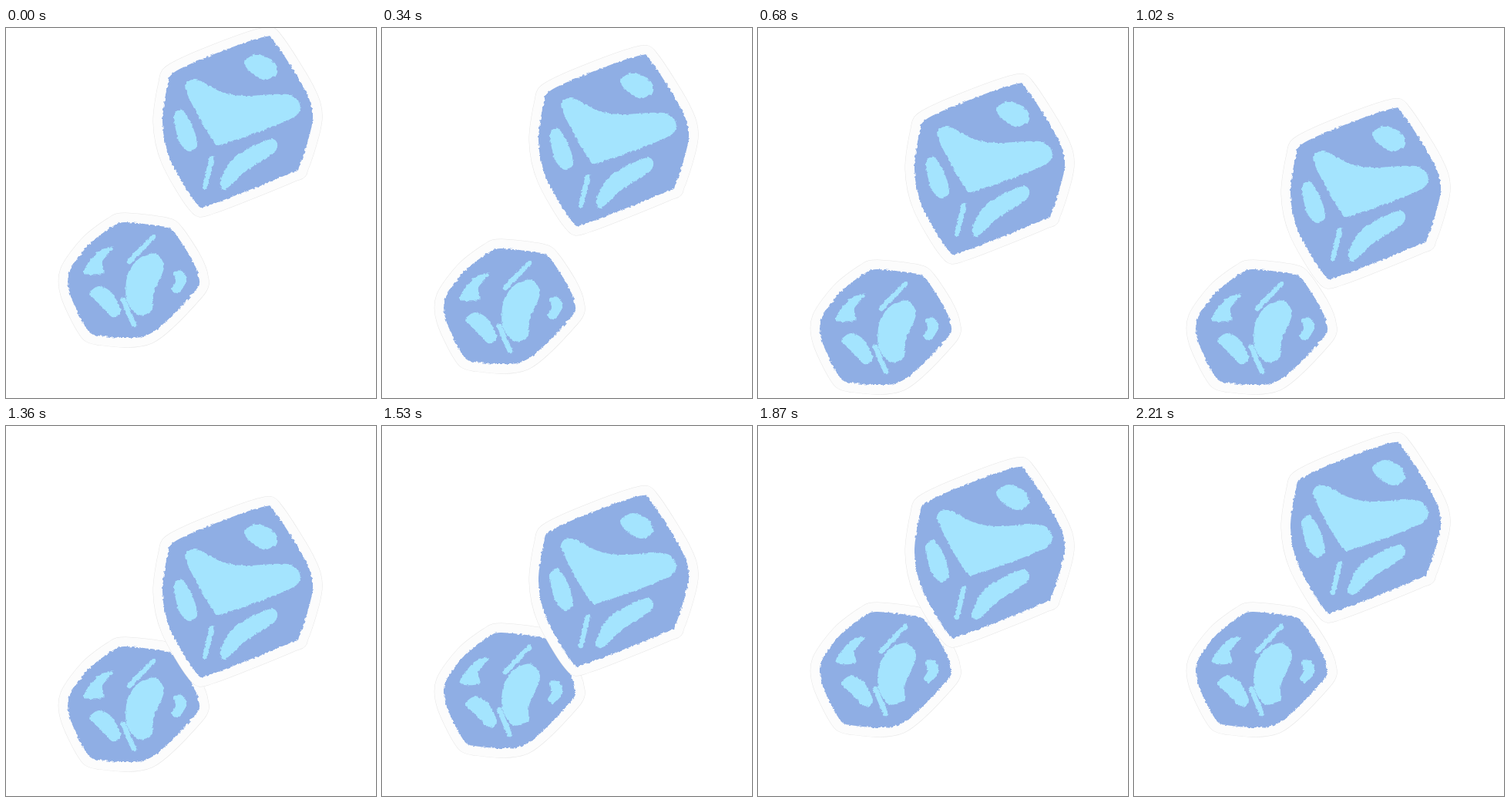
An HTML page for the animation above (2380 ms loop, 480 by 480 pixels).

```html
<!DOCTYPE html>
<html lang="en">
<head>
<meta charset="utf-8">
<title>Ice cubes</title>
<style>
html, body { margin: 0; width: 100%; height: 100%; overflow: hidden; background: #fff; }
svg { display: block; width: 100vw; height: 100vh; }
path { stroke-linejoin: round; stroke-linecap: round; }
.rim { fill: none; stroke: #e6e6e6; stroke-width: 27; }
.paper { fill: #fcfcfc; stroke: #fcfcfc; stroke-width: 26; }
.ice { fill: #8faee4; stroke: #8faee4; stroke-width: 2; }
.shine { fill: #a4e4fe; }
.stripe { stroke: #a4e4fe; stroke-width: 6.5; }
</style>
</head>
<body>
<svg id="stage" viewBox="0 0 480 480"><defs id="defs"></defs></svg>
<script>
const STEP = 170, COUNT = 14, HALF = COUNT / 2;
const SEEDS = [4, 19];
const NS = 'http://www.w3.org/2000/svg';
const stage = document.getElementById('stage');

// Each cube swings from `top` over `travel`; `ease` blends a linear move into a sine.
const small = {
  top: -14, travel: 80, ease: 1, start: 12,
  ice: '83,316 108,281 139,257 155,252 206,258 219,267 240,299 249,322 244,340 184,396 120,397 104,386 84,344',
  shines: [
    '101,313 120,289 139,284 125,302 127,317 107,319',
    '156,350 158,318 174,297 194,292 205,309 191,345 189,366 170,371',
    '218,315 230,315 234,329 223,343 215,338 220,328',
    '108,344 120,334 137,342 149,366 138,374 120,356'
  ],
  stripes: ['191,270 160,302', '152,351 166,384']
};

const big = {
  top: 0, travel: 103, ease: .5, start: 0,
  ice: '219,58 270,35 333,13 348,19 387,81 397,118 380,178 367,188 266,228 247,226 214,170 204,122 211,72',
  shines: [
    '233,80 246,67 280,83 310,88 370,87 376,114 286,149 268,145',
    '309,44 325,34 345,42 352,58 337,67 318,58',
    '218,114 228,106 241,125 248,152 237,160 224,146',
    '278,199 297,167 344,144 350,159 311,186 285,209'
  ],
  stripes: ['267,169 258,206']
};

// Closed Catmull-Rom curve through a few points.
function curve(text) {
  const p = text.split(' ').map(s => s.split(',').map(Number));
  const at = i => p[(i + p.length) % p.length];
  const handle = (i, sign) =>
    at(i).map((v, k) => (v + sign * (at(i + 1)[k] - at(i - 1)[k]) / 7).toFixed(1));
  const parts = p.map((_, i) => `C${handle(i, 1)} ${handle(i + 1, -1)} ${at(i + 1)}`);
  return `M${p[0]}${parts.join('')}Z`;
}

function add(parent, tag, attrs = {}) {
  const el = parent.appendChild(document.createElementNS(NS, tag));
  for (const name in attrs) el.setAttribute(name, attrs[name]);
  return el;
}

function addCrayon(seed) {
  const filter = add(document.getElementById('defs'), 'filter',
    { id: `crayon${seed}`, 'color-interpolation-filters': 'sRGB' });
  add(filter, 'feTurbulence', { type: 'fractalNoise', baseFrequency: .25, numOctaves: 2, seed });
  add(filter, 'feDisplacementMap',
    { in: 'SourceGraphic', scale: 4, xChannelSelector: 'R', yChannelSelector: 'G' });
}

function build(cube) {
  const body = curve(cube.ice);
  cube.el = add(stage, 'g');
  add(cube.el, 'path', { class: 'rim', d: body });
  add(cube.el, 'path', { class: 'paper', d: body });
  cube.art = add(cube.el, 'g');
  add(cube.art, 'path', { class: 'ice', d: body });
  cube.shines.forEach(s => add(cube.art, 'path', { class: 'shine', d: curve(s) }));
  cube.stripes.forEach(s => add(cube.art, 'path', { class: 'stripe', d: `M${s}` }));
}

function show(cube, step) {
  const k = (step - cube.start + COUNT) % COUNT;
  const u = Math.min(k, COUNT - k) / HALF;
  const sine = (1 - Math.cos(Math.PI * u)) / 2;
  const y = cube.top + cube.travel * (u + (sine - u) * cube.ease);
  cube.el.setAttribute('transform', `translate(0 ${Math.round(y)})`);
  // The crayon edge is redrawn on every step.
  cube.art.setAttribute('filter', `url(#crayon${SEEDS[step % SEEDS.length]})`);
}

const cubes = [small, big];
SEEDS.forEach(addCrayon);
cubes.forEach(build);
const begin = performance.now();
let shown = -1;

function tick() {
  const step = Math.floor((performance.now() - begin) / STEP) % COUNT;
  if (step !== shown) {
    cubes.forEach(cube => show(cube, step));
    shown = step;
  }
  requestAnimationFrame(tick);
}
tick();
</script>
</body>
</html>
```
